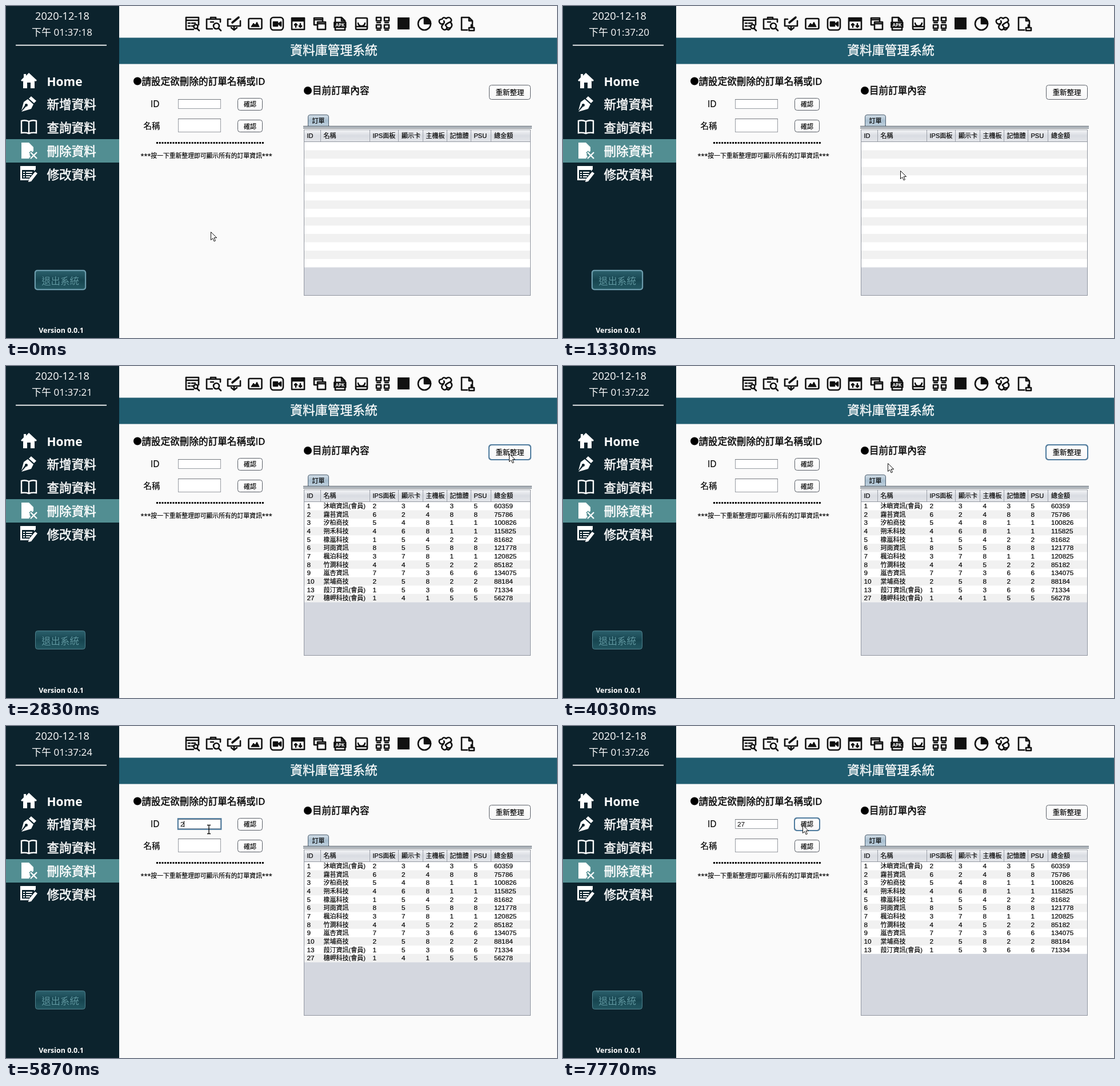
These frames come from a looping animation (964x581 px, 8000 ms). An HTML page:

```html
<!DOCTYPE html>
<html lang="zh-Hant">
<head>
<meta charset="utf-8">
<title>資料庫管理系統</title>
<style>
html, body { margin: 0; width: 100%; height: 100%; overflow: hidden; background: #fafafa; }
svg { display: block; }
text { font-family: 'Open Sans', 'Noto Sans CJK TC', 'Noto Sans CJK', sans-serif; white-space: pre; }
.mid { text-anchor: middle; }
.small { font: 11px 'Liberation Sans', 'Noto Sans CJK TC', 'Noto Sans CJK', sans-serif; }
.num { font-size: 11.8px; }
.menu { font-size: 21.6px; stroke: #fff; stroke-width: .5; }
.head { font-size: 16.6px; stroke: #000; stroke-width: .4; }
.dark { stroke: #000; stroke-width: .2; }
.line { fill: none; stroke: #111; stroke-width: 2.6; stroke-linejoin: round; stroke-linecap: round; }
.button { fill: url(#face); stroke: #5c6169; }
.field { fill: #fff; stroke: #999da3; }
.ring { fill: none; stroke: #4f7c9f; stroke-width: 2; }
</style>
</head>
<body>
<svg width="964" height="581" viewBox="0 0 964 581">
<defs>
  <linearGradient id="face" x2="0" y2="1"><stop stop-color="#fff"/><stop offset="1" stop-color="#f6f6f7"/></linearGradient>
  <linearGradient id="exit" x2="0" y2="1"><stop stop-color="#2b606c"/><stop offset=".5" stop-color="#174550"/><stop offset="1" stop-color="#235761"/></linearGradient>
  <linearGradient id="tab" x2="0" y2="1"><stop stop-color="#d3dee7"/><stop offset=".5" stop-color="#a9bfd0"/><stop offset="1" stop-color="#c0d1de"/></linearGradient>
  <linearGradient id="thead" x2="0" y2="1"><stop stop-color="#f3f4f6"/><stop offset=".5" stop-color="#d9dce2"/><stop offset="1" stop-color="#e4e6ea"/></linearGradient>
</defs>

<!-- sidebar -->
<path fill="#0c232d" d="M0 0h198v581H0z"/>
<path fill="#528e92" d="M0 233h198v41H0z"/>
<path fill="#fff" d="M17 67.8h159v1.7H17z"/>
<g fill="#fff">
  <text class="mid" x="98.5" y="24.3" font-size="18.2">2020-12-18</text>
  <text class="mid" x="98" y="52" font-size="17" id="clock"></text>
  <text x="71.5" y="140" font-size="21" font-weight="700">Home</text>
  <text class="menu" x="71.5" y="179.5">新增資料</text>
  <text class="menu" x="71.5" y="220.5">查詢資料</text>
  <text class="menu" x="71.5" y="262">刪除資料</text>
  <text class="menu" x="71.5" y="303">修改資料</text>
  <text class="mid" x="96.5" y="572" font-size="12.5" font-weight="700">Version 0.0.1</text>
  <path d="M40 117l14 13-2 2-2-1v13h-7v-10h-6v10h-7v-13l-2 1-2-2 5-5v-6h4v3z"/>
  <path d="M44 158l9 8-4 4-9-8zM38 163l10 9-4 8-17 5 8-9a2.5 2.5 0 1 0-2-2l-6 9 4-15z"/>
  <path d="M27 239h13l8 8v7l-7 6 4 7H27z"/>
  <path d="M25 280h27v6l-3 3v-2H28v15h12l-1 3H25z"/>
  <path d="M30 290h3v2h-3zm5 0h11v2H35zm-5 4h3v2h-3zm5 0h10v2H35zm-5 4h3v2h-3zm5 0h7v2h-7zM51 290l4 3-11 14-5 1 1-5z"/>
</g>
<g fill="none" stroke="#fff" stroke-width="2.4">
  <path d="M40 202q-6-3-13-1v21q7-1 13 1 6-2 13-1v-21q-7-2-13 1v21"/>
  <path d="M42 255l13 13m0-13l-13 13" stroke="#528e92" stroke-width="5"/>
  <path d="M43 256l11 11m0-11l-11 11"/>
</g>
<rect x="51.5" y="463.5" width="87" height="32" rx="4" fill="url(#exit)" stroke="#4f818d"/>
<rect id="exitRing" class="ring" x="50.8" y="462.8" width="88.4" height="33.4" rx="4" style="stroke:#6f9fb0"/>
<text class="mid" x="95" y="487" font-size="16.4" fill="#5e959e">退出系統</text>

<!-- toolbar -->
<g class="line">
  <g transform="translate(326 31)"><path d="M11 2v-13h-22v21H2M-11-6h22M-7-1h3M-1-1h6M-7 4h3M-1 4h2"/><circle cx="6" cy="5" r="3.5"/><path d="M8 8l4 4"/></g>
  <g transform="translate(363 31)"><path d="M12-3v-5h-24v17H-2M-5-8v-3h9v3M-12-4v-4M0-3h-5"/><circle cx="5" cy="4" r="5"/><path d="M9 8l4 4"/></g>
  <g transform="translate(399 31)"><path d="M-6-8h-5V4H11V-5M0 4v7M-5 7l5 4 5-4"/><path d="M-3-2L8-11" stroke-width="3.6"/></g>
  <g transform="translate(436 31)"><rect x="-11.5" y="-9" width="23" height="18" rx="2"/><path fill="#111" d="M-7 5l4-6 3 3 3-5 4 8z" stroke-width="1"/></g>
  <g transform="translate(474 31)"><rect x="-11" y="-11" width="22" height="22" rx="5"/><path fill="#111" d="M-6-3h7v7h-7zM3 0l4-3v7z"/></g>
  <g transform="translate(511 31)"><path d="M-11-10h22v20h-22zM-11-5h22M-4 6v-6m-2 2l2-2 2 2M4 0v6m-2-2l2 2 2-2"/><path d="M-10-8H10" stroke-width="4"/></g>
  <g transform="translate(549 31)"><path d="M-5 2h-5v-12H5v5M-10-7H5M-4-3h14v13H-4zM-4 0h14"/></g>
  <g transform="translate(584 31)"><path d="M-8-1v-10H3l6 6v4M-8 8v3H9V8M3-11v6h6"/><rect x="-10" y="-3" width="21" height="10" fill="#111" stroke-width="1"/><text class="mid" x="0.5" y="5" font-size="8" font-weight="700" fill="#fff" stroke="none">APK</text></g>
  <g transform="translate(622 31)"><rect x="-10" y="-10" width="20" height="20" rx="2"/><path d="M-10 5H10M-6-1q1 5 6 5t6-5"/></g>
  <g transform="translate(659 31)"><path d="M-11-11h8v6h-8zM3-11h8v6H3zM-11 2h8v6h-8zM3 2h8v6H3zM-10-2h6M4-2h6M-10 11h6M4 11h6"/></g>
  <rect x="685" y="20" width="21" height="21" fill="#111" stroke="none"/>
  <g transform="translate(732 31)"><circle r="11"/><path fill="#111" d="M0 0v-11a11 11 0 0 1 11 11z"/></g>
  <g transform="translate(769 31)"><path d="M1-9q-5-4-7 1-6 0-5 5 2 5 7 3 3-2 1-5M1-9q5-4 8 0 3 4-1 6-5 2-8 5M8-3q5 4 2 9-4 3-8 0M-4 1q-4 3-2 7 4 5 8 1 1-4-2-6M2 9q4 4 7-2"/></g>
  <g transform="translate(808 31)"><path d="M-1 11h-10v-22H2l6 6v5M2-11v6h6"/><path d="M2 7h9v5H2zM6 6V2h2v4"/></g>
</g>
<path fill="#205d70" d="M198 55.5h766v46H198z"/>
<text class="mid" x="573.5" y="85" font-size="21.8" fill="#fff" stroke="#fff" stroke-width=".3">資料庫管理系統</text>

<!-- form -->
<circle cx="230" cy="131.5" r="7"/>
<text class="head" x="237.5" y="137.5">請設定欲刪除的訂單名稱或ID</text>
<text class="dark" x="253" y="176.5" font-size="15.5">ID</text>
<text class="dark" x="240.5" y="215" font-size="14.4">名稱</text>
<rect class="field" x="301.5" y="163.5" width="74" height="16"/>
<rect class="field" x="301.5" y="197.5" width="74" height="23"/>
<path stroke="#74787e" d="M301 163.5h75M301 197.5h75"/>
<rect id="fieldRing" class="ring" x="300.8" y="162.2" width="75.6" height="18.6"/>
<text id="typed" class="small num" x="305" y="176"></text>
<path id="caret" stroke="#000" d="M.5 166v11"/>
<rect class="button" x="405.5" y="161.5" width="43" height="21" rx="4"/>
<rect class="button" x="405.5" y="199.5" width="43" height="21" rx="4"/>
<rect id="confirmRing" class="ring" x="405" y="161" width="44" height="22" rx="4"/>
<text class="small mid dark" x="427" y="176">確認</text>
<text class="small mid dark" x="427" y="214.5">確認</text>
<path stroke="#000" stroke-width="3" stroke-dasharray="3 1.74" d="M263 239.5h188"/>
<text class="dark" x="235.5" y="266" font-size="10.8">***按一下重新整理即可顯示所有的訂單資訊***</text>

<!-- orders -->
<circle cx="528" cy="148" r="7"/>
<text class="head" x="536" y="154">目前訂單內容</text>
<rect class="button" x="845.5" y="138.5" width="72" height="25" rx="4"/>
<rect id="refreshRing" class="ring" x="845" y="138" width="73" height="26" rx="4"/>
<text class="mid dark" x="881.5" y="156" font-size="12.5">重新整理</text>
<path fill="url(#tab)" stroke="#4d5f70" d="M528.5 211v-17q0-3.5 3.5-3.5h29q3.5 0 3.5 3.5v17"/>
<text class="small mid dark" x="546.5" y="205">訂單</text>
<path fill="#e9eef3" d="M520 210h400v4H520z"/>
<path stroke="#27323d" d="M520 210.5h400M520 213.5h400"/>
<path fill="#fff" d="M521 216h397v291H521z"/>
<path fill="url(#thead)" d="M522 217h395v20H522z"/>
<path stroke="#9398a1" d="M522 237.5h395"/>
<g id="table"></g>
<rect id="panel" x="522" width="395" fill="#d4d7df"/>
<rect x="521.5" y="216.5" width="396" height="290" fill="none" stroke="#9297a1"/>

<g id="cursor">
  <path id="arrow" fill="#fff" stroke="#111" d="M.5 .5v14l3.3-3 2.3 5.3 2.3-1-2.3-5.2h4.6z"/>
  <path id="beam" fill="none" stroke="#000" stroke-width="1.3" d="M-3-7.5h2.3L0-7 .7-7.5H3M0-7V7M-3 7.5h2.3L0 7l.7.5H3"/>
</g>
</svg>
<script>
const LOOP = 8000, ROW = 14.64, TOP = 237.8;
const FOCUS_REFRESH = 2430, FILL = 2530, FOCUS_FIELD = 5100;
const TYPE_2 = 5870, TYPE_7 = 6170, FOCUS_CONFIRM = 7670, REMOVE = 7750;
const $ = id => document.getElementById(id);

const headings = ['ID', '名稱', 'IPS面板', '顯示卡', '主機板', '記憶體', 'PSU', '總金額'];
const columns = [526.5, 555.5, 641.5, 692, 734.5, 776.5, 818.5, 854];
const orders = `1 沐嶼資訊(會員) 2 3 4 3 5 60359
2 霧苔資訊 6 2 4 8 8 75786
3 汐柏商技 5 4 8 1 1 100826
4 朔禾科技 4 6 8 1 1 115825
5 橡嵐科技 1 5 4 2 2 81682
6 珂雨資訊 8 5 5 8 8 121778
7 楓泊科技 3 7 8 1 1 120825
8 竹澗科技 4 4 5 2 2 85182
9 嵐杏資訊 7 7 3 6 6 134075
10 棠埔商技 2 5 8 2 2 88184
13 葭汀資訊(會員) 1 5 3 6 6 71334
27 穗岬科技(會員) 1 4 1 5 5 56278`.split('\n').map(line => line.split(' '));

const cells = (values, y, digits) => values.map((value, i) =>
  `<text class="small dark ${digits && i !== 1 ? 'num' : ''}" x="${columns[i]}" y="${y}">${value}</text>`).join('');

let markup = cells(headings, 231);
for (const x of columns.slice(1)) markup += `<path stroke="#9da2ab" d="M${Math.round(x) - 5.5} 217v20"/>`;
for (let i = 1; i < 15; i += 2)
  markup += `<rect x="522" y="${TOP + i * ROW}" width="395" height="${ROW}" fill="#f1f1f1"/>`;
orders.forEach((order, i) => markup += `<g class="order">${cells(order, 249.2 + i * ROW, true)}</g>`);
$('table').innerHTML = markup;
const orderRows = [...document.querySelectorAll('.order')];

// Pointer stops: time, x, y
const stops = [
  [0, 358, 395], [1000, 358, 395], [1700, 864, 163], [1900, 877, 158], [2200, 877, 158],
  [2500, 880, 153], [3400, 880, 153], [4520, 355, 181], [6940, 355, 181], [7440, 419, 173], [LOOP, 419, 173]
];

function pointer(t) {
  const next = Math.max(1, stops.findIndex(s => s[0] > t));
  const [t0, x0, y0] = stops[next - 1], [t1, x1, y1] = stops[next];
  const p = (t - t0) / (t1 - t0), e = p * p * (3 - 2 * p);
  return [x0 + (x1 - x0) * e, y0 + (y1 - y0) * e];
}

const show = (element, on) => element.style.display = on ? '' : 'none';

function draw(t) {
  $('clock').textContent = '下午 01:37:' + (18 + Math.floor((t + 760) / 1000));

  show($('exitRing'), t < FOCUS_REFRESH);
  show($('refreshRing'), t >= FOCUS_REFRESH && t < FOCUS_FIELD);
  const editing = t >= FOCUS_FIELD && t < FOCUS_CONFIRM;
  show($('fieldRing'), editing);
  show($('confirmRing'), t >= FOCUS_CONFIRM);

  const typed = t < TYPE_2 ? '' : t < TYPE_7 ? '2' : '27';
  $('typed').textContent = typed;
  const blinkStart = [FOCUS_FIELD, TYPE_2, TYPE_7][typed.length];
  show($('caret'), editing && (t - blinkStart) % 1000 < 500);
  $('caret').setAttribute('transform', `translate(${[305, 311, 318][typed.length]})`);

  const count = t < FILL ? 0 : t < REMOVE ? 12 : 11;
  orderRows.forEach((row, i) => show(row, i < count));
  const bottom = TOP + (count || 15) * ROW;
  $('panel').setAttribute('y', bottom);
  $('panel').setAttribute('height', 506 - bottom);

  const [x, y] = pointer(t);
  const overField = x > 301 && x < 377 && y > 163 && y < 184;
  $('cursor').setAttribute('transform', `translate(${Math.round(x)} ${Math.round(y)})`);
  show($('arrow'), !overField);
  show($('beam'), overField);
}

function frame() {
  draw(performance.now() % LOOP);
  requestAnimationFrame(frame);
}
frame();
</script>
</body>
</html>
```
